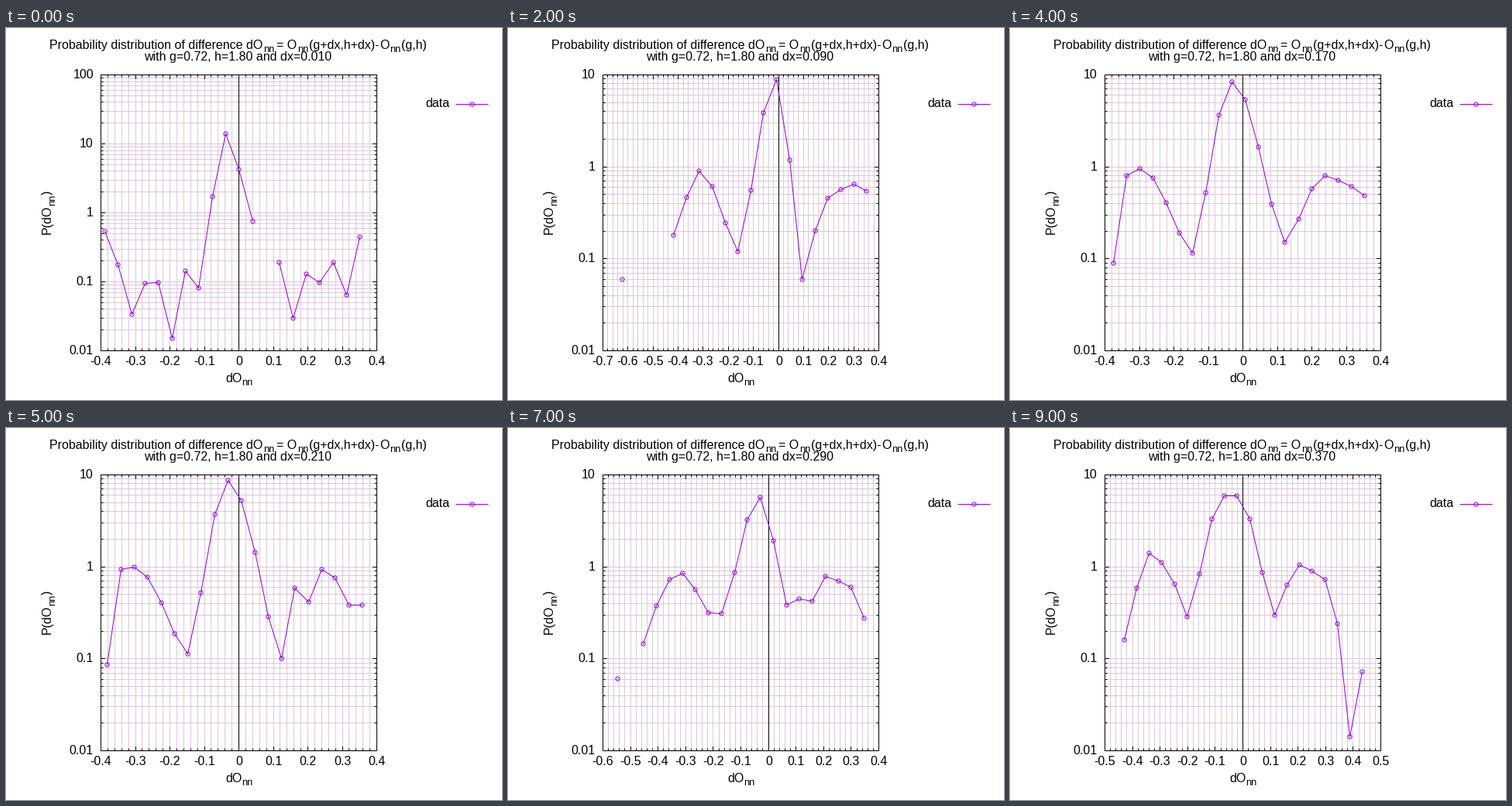
A matplotlib script that plays this animation: 640x480 px, repeating every 10 s.

```python
import numpy as np
import matplotlib.pyplot as plt
from matplotlib.animation import FuncAnimation
from matplotlib.patches import Circle, Rectangle

W, H, DPI = 640, 480, 100
PX = 72 / DPI                      # one pixel in points
TOP, BOTTOM = 60, 416
BINS = 20
VIOLET, GRID = "#9400d3", "#dcc8dc"

plt.rcParams["font.family"] = "Liberation Sans"

fig = plt.figure(figsize=(W / DPI, H / DPI), dpi=DPI, facecolor="white")
ax = fig.add_axes([0, 0, 1, 1])


def fill_bins(keys):
    """log10 of each bin from peaks and troughs; a zero marks empty bins.

    On a log scale the peaks are round and the troughs are sharp.
    """
    out = np.full(BINS, np.nan)
    points = sorted(keys.items())
    for (i, a), (j, b) in zip(points, points[1:]):
        if a and b:
            low, high = sorted(np.log10([a, b]))
            t = np.linspace(0, 1, j - i + 1)
            t = t if a < b else t[::-1]
            out[i:j + 1] = low + (high - low) * np.sin(np.pi / 2 * t) ** 1.5
        elif a:
            out[i] = np.log10(a)
    return out


class View:
    """A histogram with axes scaled to fit it; x is kept in tenths."""

    def __init__(self, first, last, keys):
        self.x = 10 * np.linspace(first, last, BINS)
        self.power = fill_bins(keys)
        self.step = 1 if last - first < 1 else 2
        self.lo = int(np.floor(self.x[0] / self.step)) * self.step
        self.hi = int(np.ceil(self.x[-1] / self.step)) * self.step
        self.low = int(np.floor(np.nanmin(self.power)))
        self.high = int(np.ceil(np.nanmax(self.power)))
        self.wide = self.low < -1      # longer labels need more margin
        self.left, self.right = (122, 478) if self.wide else (117, 474)

    def px(self, tenths):
        part = (np.asarray(tenths) - self.lo) / (self.hi - self.lo)
        return center(self.left + (self.right - self.left) * part)

    def py(self, power):
        part = (np.asarray(power) - self.low) / (self.high - self.low)
        return center(BOTTOM - (BOTTOM - TOP) * part)


def center(v):
    """Middle of the nearest pixel."""
    return np.floor(v + 0.5) + 0.5


VIEWS = [
    View(-0.389, 0.351, {0: .54, 2: .034, 3: .095, 4: .097, 5: .015, 6: .144,
                         7: .081, 9: 14, 11: .75, 12: 0, 13: .19, 14: .03,
                         15: .13, 16: .097, 17: .19, 18: .064, 19: .45}),
    View(-0.393, 0.353, {0: .43, 2: .88, 3: .29, 6: .235, 7: .26, 9: 7.3,
                         10: 7.7, 12: .25, 13: .174, 14: .247, 15: .101,
                         16: .76, 17: .51, 18: .59, 19: .59}),
    View(-0.623, 0.351, {0: .06, 1: 0, 4: .18, 6: .9, 9: .12, 12: 8.9,
                         14: .06, 16: .46, 18: .65, 19: .545}),
    View(-0.490, 0.337, {0: .064, 1: 0, 3: .92, 5: .67, 6: .26, 8: .115,
                         11: 8.1, 14: .2, 17: .69, 19: .58}),
    View(-0.375, 0.352, {0: .09, 1: .8, 2: .95, 6: .115, 9: 8.4, 13: .15,
                         16: .8, 17: .72, 19: .48}),
    View(-0.381, 0.357, {0: .086, 1: .94, 2: .99, 6: .113, 9: 8.7, 13: .1,
                         14: .59, 15: .415, 16: .94, 17: .76, 18: .385,
                         19: .385}),
    View(-0.460, 0.352, {0: .07, 3: .88, 4: .85, 7: .19, 10: 7.3, 13: .2,
                         16: .82, 17: .74, 19: .33}),
    View(-0.547, 0.347, {0: .061, 1: 0, 2: .145, 4: .73, 5: .85, 7: .315,
                         8: .31, 11: 5.7, 13: .385, 14: .45, 15: .42,
                         16: .79, 18: .6, 19: .275}),
    View(-0.545, 0.470, {0: .06, 2: .15, 4: 1.1, 7: .3, 9: 5.8, 10: 4.9,
                         12: .38, 14: .9, 16: .66, 19: .07}),
    View(-0.430, 0.433, {0: .16, 2: 1.41, 3: 1.12, 5: .287, 8: 5.9, 9: 5.9,
                         12: .3, 14: 1.05, 16: .73, 17: .24, 18: .0142,
                         19: .072}),
]


def text(x, y, s, ha="left", size=16):
    ax.text(x, y, s, ha=ha, va="baseline", fontsize=size * PX)


def upright(x, y, s, size=16):
    """Text that reads upwards from (x, y)."""
    ax.text(x, y, s, ha="left", va="baseline", fontsize=size * PX,
            rotation=90, rotation_mode="anchor")


def sub(x, y):
    text(x, y, "nn", size=12.8)


def vlines(xs, y0, y1, color="black", z=3):
    ax.vlines(xs, y0, y1, colors=color, linewidth=PX, snap=False, zorder=z)


def hlines(ys, x0, x1, color="black", z=3):
    ax.hlines(ys, x0, x1, colors=color, linewidth=PX, snap=False, zorder=z)


def curve(xs, ys):
    ax.plot(xs, ys, color=VIOLET, lw=PX, snap=False, zorder=5)


def markers(xs, ys):
    for x, y in zip(xs, ys):
        if not np.isnan(y):
            ax.add_patch(Circle((x, y), 2.6, fill=False, ec=VIOLET, lw=PX,
                                snap=False, zorder=6))
            ax.add_patch(Circle((x, y), 0.6, fc=VIOLET, lw=0, zorder=6))


def draw_axes(v):
    parts = 5 if v.step == 1 else 4
    major = np.arange(v.lo, v.hi + 1, v.step)
    minor = np.linspace(v.lo, v.hi, (len(major) - 1) * parts + 1)
    powers = np.arange(v.low, v.high + 1)
    fine = (powers[:-1, None] + np.log10(np.arange(1, 10))).ravel()

    x0, x1 = v.left + 0.5, v.right + 0.5
    y0, y1 = TOP + 0.5, BOTTOM + 0.5
    vlines(v.px(minor), y0, y1, GRID, 1)
    hlines(v.py(fine), x0, x1, GRID, 1)

    for ticks, size in ((minor, 3), (major, 5.5)):
        vlines(v.px(ticks), y0, y0 + size)
        vlines(v.px(ticks), y1 - size, y1)
    for ticks, size in ((fine, 3), (powers, 5.5)):
        hlines(v.py(ticks), x0, x0 + size)
        hlines(v.py(ticks), x1 - size, x1)
    ax.add_patch(Rectangle((x0, y0), x1 - x0, y1 - y0, fill=False,
                           ec="black", lw=PX, snap=False, zorder=3))
    vlines(v.px(0), y0, y1)

    for t in major:
        label = f"{t / 10:.1f}" if t else "0"
        text(v.px(t), 435, label, ha="center")
    for p in powers:
        text(v.left - 9, v.py(p) + 4.5, f"{10.0 ** p:g}", ha="right")


def draw_labels(v, dx):
    s = v.left - 122
    text(56 + s, 27, "Probability distribution of difference dO")
    sub(332 + s, 31)
    text(349 + s, 27, "= O")
    sub(376 + s, 31)
    text(391 + s, 27, "(g+dx,h+dx)-")
    text(482 + s, 27, "O")
    sub(495 + s, 31)
    text(510 + s, 27, "(g,h)")
    text(178 + s, 42, f"with g=0.72, h=1.80 and dx={dx:.3f}")

    text(283 + s, 457, "dO")
    sub(304 + s, 461)

    x = 58 if v.wide else 62
    upright(x, 266, "P(dO")
    upright(x + 5, 229, "nn", 12.8)
    upright(x, 215, ")")

    text(572, 102, "data", ha="right")
    curve([581, 622], [98.5, 98.5])
    markers([601.5], [98.5])


def draw(i):
    ax.clear()
    ax.set_xlim(0, W)
    ax.set_ylim(H, 0)
    ax.axis("off")
    v = VIEWS[i]
    draw_axes(v)
    draw_labels(v, 0.01 + 0.04 * i)
    xs, ys = v.px(v.x), v.py(v.power)
    curve(xs, ys)
    markers(xs, ys)
    return []


anim = FuncAnimation(fig, draw, frames=len(VIEWS), init_func=lambda: [],
                     interval=1000, repeat=True, repeat_delay=0)
plt.show()
```
